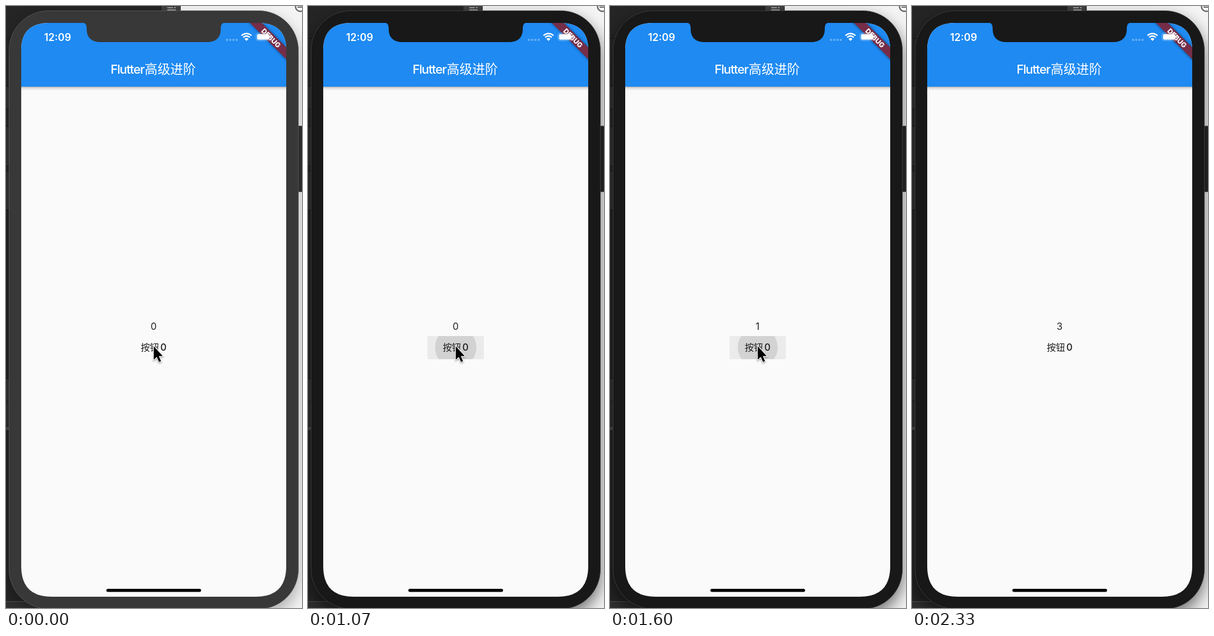
An HTML page for the animation above (2.99 s loop, 525 by 1067 pixels).

```html
<!DOCTYPE html>
<html lang="zh-CN">
<head>
<meta charset="utf-8">
<title>Button counter</title>
<style>
  html, body { margin: 0; width: 100%; height: 100%; overflow: hidden; background: #222; }
  svg { display: block; width: 525px; height: 1067px; }
  text { font-family: Inter, Roboto, sans-serif; }
  .han { font-family: "Noto Sans CJK SC", "Noto Sans CJK", sans-serif; font-weight: 500; }
</style>
</head>
<body>
<svg viewBox="0 0 525 1067" xmlns="http://www.w3.org/2000/svg">
  <defs>
    <clipPath id="screenClip">
      <path d="M27 78Q27 30 77 30H447Q497 30 497 78V993Q497 1047 443 1047H81Q27 1047 27 993Z"/>
    </clipPath>
    <clipPath id="buttonClip"><rect x="212" y="585" width="100" height="41" rx="2.5"/></clipPath>
    <linearGradient id="barShadow" x2="0" y2="1">
      <stop stop-color="#000" stop-opacity=".28"/>
      <stop offset=".4" stop-color="#000" stop-opacity=".1"/>
      <stop offset="1" stop-color="#000" stop-opacity="0"/>
    </linearGradient>
    <filter id="soft" x="-20%" y="-20%" width="140%" height="140%"><feGaussianBlur stdDeviation="14"/></filter>
    <filter id="bandSoft" x="-20%" y="-60%" width="140%" height="220%"><feGaussianBlur stdDeviation="2.5"/></filter>
    <filter id="arrowSoft" x="-50%" y="-50%" width="200%" height="200%"><feGaussianBlur stdDeviation="1.5"/></filter>
    <path id="arrow" d="M262 603V627L267.4 622L271.4 631L275 629.4L271.1 620.6H278Z"/>
  </defs>

  <!-- desktop behind the phone -->
  <rect width="525" height="1067" fill="#f4f4f4"/>
  <rect width="310" height="1067" fill="#252525"/>
  <g id="panels"></g>
  <rect x="275" width="35" height="10" fill="#404040"/>
  <path d="M275 0V10" stroke="#1a1a1a"/>
  <path d="M286 3H296M286 7H301M298 3H301" stroke="#bbb" stroke-width="1.6"/>
  <circle cx="522" cy="1" r="8.5" fill="none" stroke="#666" stroke-width="2.4"/>
  <path d="M517 2H525" stroke="#666" stroke-width="2"/>

  <!-- phone -->
  <rect id="shadow" x="5" y="20" width="514" height="1061" rx="70" filter="url(#soft)"/>
  <rect id="sideKey" x="516.5" y="213" width="10" height="116" rx="2" stroke="#222"/>
  <rect id="body" x="5.5" y="8.5" width="513" height="1060" rx="70"/>

  <g clip-path="url(#screenClip)">
    <rect x="27" y="30" width="470" height="1017" fill="#fafafa"/>
    <rect x="27" y="143" width="470" height="7" fill="url(#barShadow)"/>
    <rect x="27" y="30" width="470" height="113" fill="#1e8af2"/>
    <g transform="translate(497 30) rotate(45)">
      <rect x="-50" y="30.5" width="100" height="15" opacity=".5" filter="url(#bandSoft)"/>
      <rect x="-50" y="30.5" width="100" height="15" fill="#752d48"/>
      <text y="42.4" font-size="12.2" font-weight="800" fill="#fff" text-anchor="middle">DEBUG</text>
    </g>
  </g>
  <path id="notch" d="M134 29Q143 29.5 143 38V40Q143 64 168 64H356Q381 64 381 40V38Q381 29.5 390 29Z"/>

  <!-- status bar -->
  <g fill="#fff">
    <text x="67.5" y="62" font-size="18" font-weight="600">12:09</text>
    <g id="dots" opacity=".32"></g>
    <path d="M426.5 62L423 58.2Q426.5 55.4 430 58.2Z"/>
    <path d="M420.6 55.6Q426.5 50.6 432.4 55.6M417.6 52.4Q426.5 45 435.4 52.4" fill="none" stroke="#fff" stroke-width="2.5"/>
    <rect x="443.5" y="48" width="27" height="13.5" rx="3.8" fill="none" stroke="#fff" opacity=".4"/>
    <rect x="445.3" y="49.8" width="22" height="9.9" rx="2.2"/>
    <text x="185.5" y="119.5" font-size="22" font-weight="500" letter-spacing="-1.2">Flutter</text>
    <text class="han" x="246" y="119.8" font-size="22.7">高级进阶</text>
  </g>

  <!-- page -->
  <text id="count" x="261.8" y="574" font-size="17" fill="#222" text-anchor="middle">0</text>
  <g clip-path="url(#buttonClip)">
    <rect id="highlight" x="212" y="585" width="100" height="41"/>
    <circle id="splash" cx="262" cy="605"/>
  </g>
  <g fill="#1c1c1c">
    <text class="han" x="239" y="611.2" font-size="16.3">按钮</text>
    <text x="279.2" y="611" font-size="17" font-weight="500" text-anchor="middle">0</text>
  </g>
  <rect x="178" y="1033" width="168" height="5.5" rx="2.75"/>
  <g id="cursor">
    <use href="#arrow" y="1.5" opacity=".45" stroke="#000" stroke-width="2" filter="url(#arrowSoft)"/>
    <use href="#arrow" stroke="#fff" stroke-width="2.6" stroke-linejoin="round"/>
    <use href="#arrow"/>
  </g>
</svg>

<script>
  const LOOP = 2990, STEP = 1000 / 15, FADE = 200;
  const FOCUS_AT = 930, CURSOR_GONE = 2330;
  const presses = [
    { down: 960, up: 1195 },
    { down: 1500, up: 1650 },
    { down: 1850, up: 2040 }
  ];

  const el = id => document.getElementById(id);
  const clamp = v => Math.max(0, Math.min(1, v));

  function add(parent, name, attrs) {
    const node = document.createElementNS("http://www.w3.org/2000/svg", name);
    for (const key in attrs) node.setAttribute(key, attrs[key]);
    el(parent).append(node);
  }

  function set(id, attrs) {
    for (const key in attrs) el(id).setAttribute(key, attrs[key]);
  }

  // top, bottom, fill of the strips left of the phone
  [[57, 142, "#272727"], [142, 182, "#333"], [182, 213, "#292929"], [213, 283, "#333"],
   [283, 292, "#2a2a2a"], [292, 361, "#333"], [660, 700, "#343436"], [700, 744, "#303030"],
   [744, 752, "#484848"], [1055, 1067, "#303030"]
  ].forEach(([top, bottom, fill]) => {
    add("panels", "rect", { y: top, width: 60, height: bottom - top, fill });
    add("panels", "rect", { y: top, width: 60, height: 1, fill: top > 1000 ? "#555" : "#151515" });
    if (top < 1000) add("panels", "rect", { y: bottom, width: 60, height: 1, fill: "#151515" });
  });
  for (let i = 0; i < 4; i++) add("dots", "circle", { cx: 392 + i * 5.7, cy: 60, r: 2.1 });

  function draw(ms) {
    // the screen refreshes 15 times per second
    const t = Math.floor((ms + 4) / STEP) * STEP;
    const focused = t >= FOCUS_AT;
    const shell = focused ? "#181818" : "#383838";
    set("body", { fill: shell, stroke: focused ? "#3c3c3c" : "#555" });
    set("notch", { fill: shell });
    set("sideKey", { fill: focused ? "#202020" : "#2c2c2c" });
    set("shadow", { opacity: focused ? 0.55 : 0.3 });

    const press = presses.filter(p => t >= p.down).pop();
    let glow = 0, ink = 0, radius = 0;
    if (press) {
      const fade = Math.max(0, t - press.up) / FADE;
      const held = Math.min(t, press.up) - press.down;
      glow = clamp(clamp(held / FADE) - fade);
      ink = clamp(1 - fade);
      radius = 18 + 35 * clamp((t - press.down) / FADE);
    }
    set("highlight", { opacity: 0.12 * glow });
    set("splash", { opacity: 0.1 * ink, r: radius });

    el("count").textContent = presses.filter(p => t >= p.up).length;
    set("cursor", { visibility: t < CURSOR_GONE ? "visible" : "hidden" });
  }

  const start = performance.now();
  function tick() {
    draw((performance.now() - start) % LOOP);
    requestAnimationFrame(tick);
  }
  tick();
</script>
</body>
</html>
```
